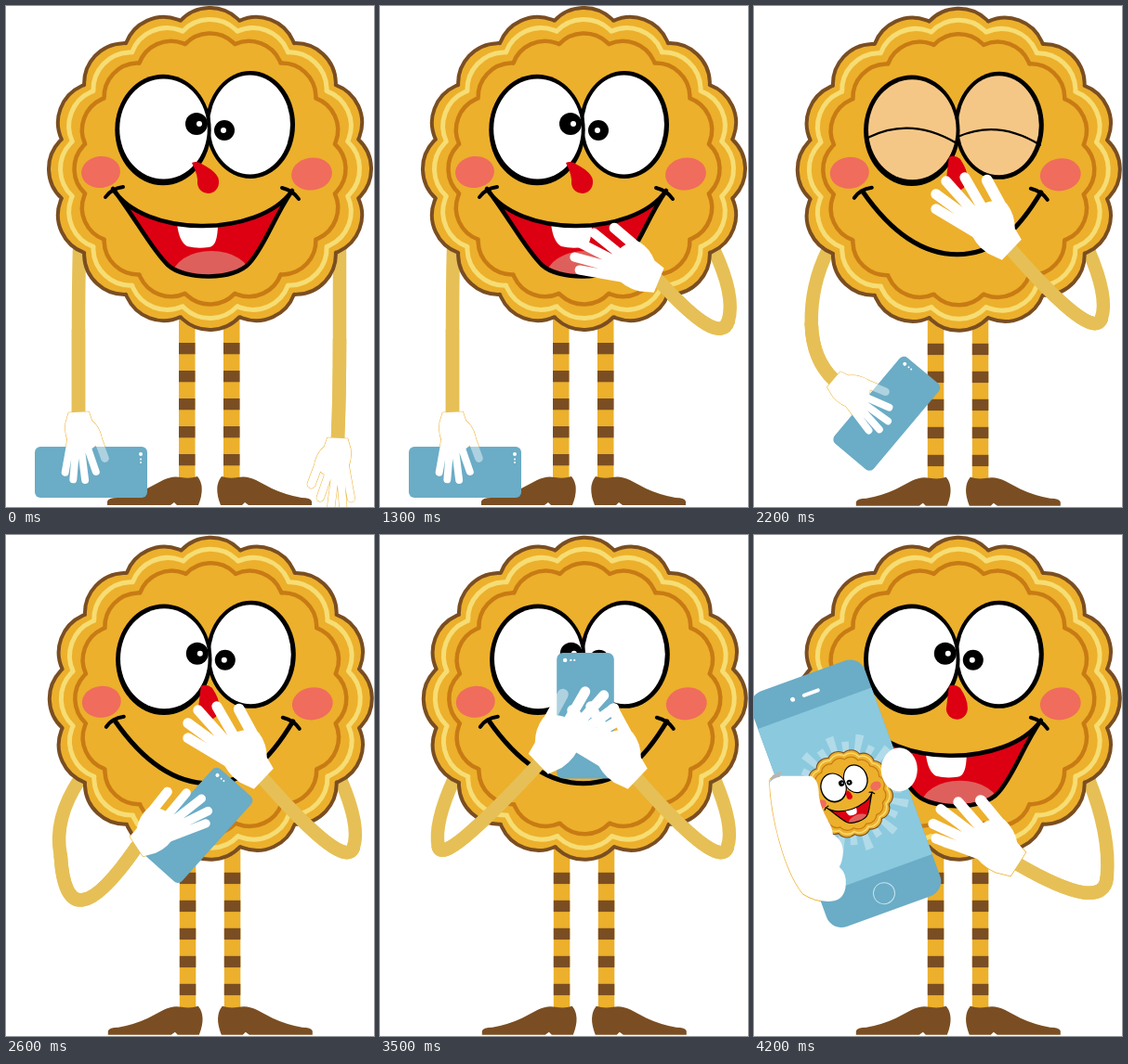
Recreate the animation shown at these times as an HTML page with a canvas. Size 396x540 px, loop 6200 ms.

```html
<!DOCTYPE html>
<html>
<head>
<meta charset="utf-8">
<title>Cookie with a phone</title>
<style>
html, body { margin: 0; width: 100%; height: 100%; overflow: hidden; background: #fff; }
canvas { display: block; }
</style>
</head>
<body>
<canvas id="stage" width="396" height="540"></canvas>
<script>
const g = document.getElementById('stage').getContext('2d');
const GOLD = '#ecb02c', BROWN = '#7a4e22', ARM = '#e6c056', RED = '#dc0012', BLUE = '#6bacc6';
const rad = d => d * Math.PI / 180;

function fill(d, color) { g.fillStyle = color; g.fill(new Path2D(d)); }
function line(d, color, width) {
  g.strokeStyle = color; g.lineWidth = width; g.stroke(new Path2D(d));
}
function oval(x, y, rx, ry, color, rot = 0) {
  g.beginPath(); g.ellipse(x, y, rx, ry, rot, 0, 7);
  g.fillStyle = color; g.fill();
}
function box(x, y, w, h, r, color) {
  g.beginPath(); g.roundRect(x, y, w, h, r);
  g.fillStyle = color; g.fill();
}
function at(x, y, rot, sx, sy, draw) {
  g.save();
  g.translate(x, y); g.rotate(rad(rot)); g.scale(sx, sy);
  draw();
  g.restore();
}

// Scalloped ring with 16 bumps
function ring(r, color, width) {
  g.beginPath();
  for (let i = 0; i < 16; i++) {
    const a = rad(22.5 * i);
    g.arc(219.5 + .75 * r * Math.cos(a), 175.5 + .75 * r * Math.sin(a), .25 * r, a - .822, a + .822);
  }
  g.closePath();
  g.fillStyle = GOLD; g.fill();
  g.strokeStyle = color; g.lineWidth = width; g.stroke();
}

function eyes(closed) {
  const white = closed ? '#f5c787' : '#fff';
  oval(263, 128, 48, 58, '#000');
  oval(262.5, 128, 43.5, 53.5, white);
  oval(169, 133.5, 51.7, 59.8, '#000');
  oval(169.5, 132.5, 47.3, 54, white);
  if (closed) {
    line('M122 141Q168 118 217 147M219 140Q262 121 307 149', '#000', 2.2);
    return;
  }
  oval(205, 127, 12, 12, '#000');
  oval(208, 127, 3, 3, '#fff');
  oval(235, 134, 11, 11, '#000');
  oval(234, 134, 3, 3, '#fff');
}

function mouth(closed) {
  if (closed) {
    line('M116 199C150 248 185 267 218 267C258 267 284 240 308 200', '#000', 5);
  } else {
    const lips = 'M115 197C147 249 271 251 308 199C288 228 279 258 262 277C246 296 192 296 174 279C157 263 139 228 115 197Z';
    fill(lips, RED);
    g.save();
    g.clip(new Path2D(lips));
    oval(221, 291, 42, 27, '#de605c');
    g.restore();
    fill('M184 234Q206 239 228 234Q228 260 218 260Q206 262 195 259Q186 254 184 234Z', '#fff');
    line(lips, '#000', 4.6);
  }
  line('M107 206Q113 197 126 195M297 196Q309 199 315 208', '#000', 4);
}

function cookie(face, nose) {
  ring(173.5, BROWN, 4);
  ring(161, '#f6dd74', 5);
  ring(146, '#c87b14', 4.5);
  oval(102, 179, 21, 17, '#f06c5c', -.1);
  oval(329, 181, 22, 17.5, '#f06c5c', -.15);
  mouth(face.mouth);
  eyes(face.eyes);
  const [x, y, bulb] = nose;
  fill(`M${x} ${y}Q${x + 6} ${y - 3} ${x + 12} ${y + 2}Q229 ${bulb - 9} 229 ${bulb}A11.5 12 0 0 1 206 ${bulb + 2}Q207 ${bulb - 6} ${x} ${y}Z`, RED);
}

function legs() {
  for (const x of [186, 234]) {
    box(x, 330, 17.5, 182, 0, GOLD);
    for (let y = 363; y < 490; y += 30) box(x, y, 17.5, 12.3, 0, BROWN);
  }
  const shoe = () => fill('M109 538V534Q110 530 120 530Q137 527 152 520L169 511Q179 506 188 508Q198 510 206 507Q215 518 207 538H184L181 535L177 538Z', BROWN);
  shoe();
  at(438, 0, 0, -1, 1, shoe);
}

// Arm pose: bend, elbow, bend, wrist (x, y each), hand angle, hand scale
const right = {
  down: [359, 300, 359, 360, 359, 420, 357, 466, -131, .72],
  swing: [388, 310, 380, 350, 371, 388, 350, 406, -84, .72],
  nose: [381, 313, 373, 336, 364, 362, 283, 259, 0, 1],
  hold: [381, 313, 373, 336, 364, 362, 276, 262, 0, 1],
  low: [383, 322, 379, 368, 376, 408, 283, 354, -11, 1]
};
const left = {
  down: [78, 300, 78, 350, 78, 400, 78, 438, 131, .72],
  lift: [60, 300, 61, 342, 62, 380, 85, 402, 84, .72],
  mid: [50, 305, 58, 345, 64, 445, 140, 335, 10, .85],
  hold: [57, 310, 62, 335, 66, 358, 170, 246, 0, 1],
  show: [60, 312, 65, 336, 69, 356, 170, 268, 0, 1]
};
const mix = (a, b, u) => a.map((v, i) => v + (b[i] - v) * u);
const raise = (p, d) => p.map((v, i) => i == 7 ? v - d : v);

function arm(p, x) {
  line(`M${x} 262Q${p.slice(0, 4)}`, ARM, 14.5);
  forearm(p);
}
function forearm(p) { line(`M${p.slice(2, 4)}Q${p.slice(4, 8)}`, ARM, 14.5); }

const PALM = 'M11-11L4-23Q4-38-5-50Q-20-56-34-48Q-48-38-46-24Q-40-6-25 4L-10 11Z';
const FINGERS = 'M-50-78L-27-38M-70-74L-36-36M-81-60L-40-30M-81-44L-36-17';
const THUMB = 'M-26-75L-7-40';

// A thin golden edge shows only where the stage is still empty
function edge(draw) {
  g.globalCompositeOperation = 'destination-over';
  draw();
  g.globalCompositeOperation = 'source-over';
}
function hand(p, side, parts) {
  at(p[6], p[7], p[8], side * p[9], p[9], () => {
    const draw = (color, more) => {
      if (parts != 'thumb') {
        fill(PALM, color);
        if (more) line(PALM, color, more);
        line(FINGERS, color, 11 + more);
      }
      if (parts != 'fingers') line(THUMB, color, 12 + more);
    };
    draw('#fff', 0);
    edge(() => draw(GOLD, 1.4));
  });
}

function phone([x, y, rot, s]) {
  at(x, y, rot, s, s, () => {
    box(-27.5, -60.5, 55, 121, 6, BLUE);
    oval(-19.5, -53.5, 2, 2, '#fff');
    oval(-14, -53.5, 1, 1, '#fff');
    oval(-10.5, -53.5, 1, 1, '#fff');
  });
}

function bigPhone() {
  at(98, 278, -20, 1, 1, () => {
    box(-65, -135, 130, 270, 17, BLUE);
    box(-65, -98, 130, 191, 0, '#8bc9de');
    g.fillStyle = 'rgba(255,255,255,.33)';
    for (let i = 0; i < 24; i++) {
      const a = rad(15 * i), r = i % 2 ? 56 : 64;
      g.beginPath();
      g.moveTo(4, 1);
      g.arc(4, 1, r, a - .07, a + .07);
      g.fill();
    }
    line('M-6-115H10', '#fff', 4);
    oval(-19, -115, 2.5, 2.5, '#fff');
    g.beginPath(); g.arc(2, 115, 11.5, 0, 7);
    g.strokeStyle = '#c5e4ee'; g.lineWidth = 1; g.stroke();
  });
  at(101.5, 278, -19, .272, .272, () => {
    g.translate(-219.5, -175.5);
    cookie({}, upright);
  });
  const grip = 'M16 264Q17 258 30 259H60Q69 262 69 280C72 302 84 310 84 322Q96 329 95 343Q94 352 91 357Q99 364 98 376Q97 393 82 394Q66 395 52 386C31 360 17 300 16 264Z';
  fill(grip, '#fff');
  fill('M16 266Q17 256 29 254L27 260Q20 261 16 266Z', '#b5b5b5');
  oval(155.5, 252, 19.5, 23.5, '#fff');
  edge(() => line(grip, GOLD, 1.4));
}

const phones = {
  down: [91.5, 502.5, 90, 1],
  lift: [142, 438.5, 40, 1],
  mid: [205, 312, 42, 1.02],
  hold: [220.2, 194, 0, 1.12],
  up: [220.2, 181, 0, 1.12],
  show: [227.2, 213.5, 0, 1.23]
};

const A = [0, 0], B = [-.6, .7], C = [.8, .8];
// Nose: tip x, tip y, bulb y
const straight = [200, 169, 189], pushed = [200, 161, 189], upright = [209, 162, 185];
const shut = { eyes: 1, mouth: 1 }, smile = { mouth: 1 }, open = {};
const key = (t, shift, l, r, ph, face, nose) => ({ t, shift, l, r, ph, face, nose });
const swing = u => mix(right.swing, right.nose, u);

const keys = [
  key(0, A, left.down, right.down, phones.down, open, straight),
  ...[0, .25, .5, .75, .93].map((u, i) =>
    key(1000 + 100 * i, i % 2 ? A : B, left.down, swing(u), phones.down, open, straight)),
  key(1600, B, left.down, swing(1), phones.down, open, pushed),
  key(1800, B, left.down, right.nose, phones.down, open, pushed),
  key(2000, C, left.lift, right.nose, phones.lift, open, pushed),
  key(2200, C, left.lift, right.hold, phones.lift, shut, upright),
  key(2400, C, left.mid, right.hold, phones.mid, shut, upright),
  key(2600, C, left.mid, right.hold, phones.mid, smile, upright),
  key(3100, C, left.hold, right.hold, phones.hold, smile, upright),
  key(3300, C, raise(left.hold, 13), raise(right.hold, 13), phones.up, smile, upright),
  key(3500, C, left.hold, right.hold, phones.hold, smile, upright),
  key(3700, C, left.show, right.low, phones.show, open, upright),
  key(4200, C, null, right.low, null, open, upright)
];

function draw(k) {
  g.clearRect(0, 0, 396, 540);
  g.save();
  g.translate(...k.shift);
  g.lineCap = g.lineJoin = 'round';
  legs();
  if (k.l) arm(k.l, 79);
  arm(k.r, 359);
  cookie(k.face, k.nose);
  forearm(k.r);
  if (k.l) {
    forearm(k.l);
    hand(k.l, -1, 'thumb');
    phone(k.ph);
    g.globalAlpha = .45;
    hand(k.l, -1, 'thumb');
    g.globalAlpha = 1;
  }
  hand(k.r, 1);
  if (k.l) hand(k.l, -1, 'fingers');
  else bigPhone();
  g.restore();
}

function tick(now) {
  const t = now % 6200;
  draw(keys.findLast(k => k.t <= t));
  requestAnimationFrame(tick);
}
tick(0);
</script>
</body>
</html>
```
